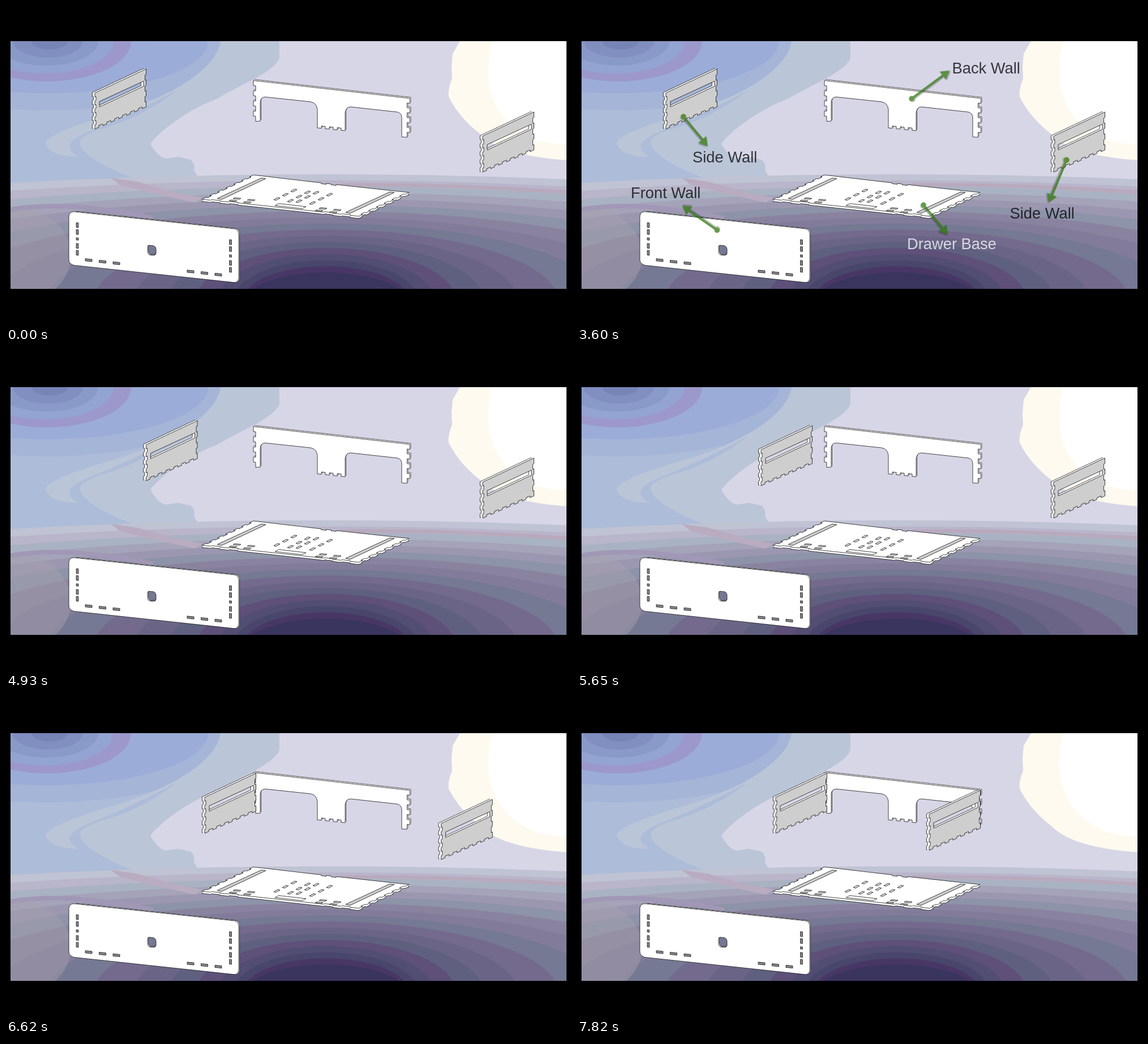
Animation of 998 by 561 pixels, one loop 8 s. Source, as an HTML page:

```html
<!DOCTYPE html>
<html lang="en">
<head>
<meta charset="utf-8">
<title>Drawer assembly</title>
<style>
  html, body { margin: 0; width: 100%; height: 100%; overflow: hidden; background: #000; }
  svg { display: block; width: 100vw; height: 100vh; }
  text { font: 27.3px "Liberation Sans", Arial, sans-serif; }
  .part { stroke: #151515; stroke-width: .8; stroke-linejoin: round; }
  path { fill-rule: evenodd; }
</style>
</head>
<body>
<svg id="stage" viewBox="0 0 998 561">
  <defs>
    <clipPath id="view"><rect x="8" y="62" width="982" height="437"/></clipPath>
    <filter id="shadow" x="-30%" y="-30%" width="160%" height="160%">
      <feDropShadow dx="1" dy="1.5" stdDeviation="1.2" flood-opacity=".55"/>
    </filter>
  </defs>
  <g id="backdrop" clip-path="url(#view)"></g>
  <g id="parts"></g>
  <g id="labels"></g>
</svg>
<script>
const LOOP = 8000, STEP = 120;
const byId = id => document.getElementById(id);
const repeat = (n, make) => Array.from({ length: n }, (_, i) => make(i)).join('');
const poly = points => 'M' + points.map(p => p.join(' ')).join('L') + 'Z';
const fill = (d, color, extra = '') => `<path d="${d}" fill="${color}" ${extra}/>`;
const line = (d, color, width) => `<path d="${d}" fill="none" stroke="${color}" stroke-width="${width}"/>`;
const ellipse = (cx, cy, rx, ry, color) =>
  `<ellipse cx="${cx}" cy="${cy}" rx="${rx}" ry="${ry}" fill="${color}"/>`;
const mix = (a, b, k) => a.map((v, i) => v + (b[i] - v) * k);
const rgb = c => `rgb(${c.map(Math.round)})`;

// Edge from a to b in equal segments, every second one displaced by (dx, dy)
function notched([ax, ay], [bx, by], segments, dx, dy) {
  const points = [];
  for (let i = 0; i < segments; i++)
    for (const k of [i / segments, (i + 1) / segments])
      points.push([ax + (bx - ax) * k + (i % 2) * dx, ay + (by - ay) * k + (i % 2) * dy]);
  return points;
}

// Plate swept by (dx, dy): outlined back, plain filling, front face
function plate(d, dx, dy, face = '#fff') {
  const copy = (k, extra) => fill(d, '#fff', `${extra} transform="translate(${dx * k} ${dy * k})"`);
  return copy(1, 'class="part"') + copy(.7, '') + copy(.35, '') + fill(d, face, 'class="part"');
}

function hazeBand(i, count) {
  const u = i / (count - 1);
  const pale = [191, 195, 211], middle = [139, 137, 163], dark = [60, 51, 95];
  const base = u < .35 ? mix(pale, middle, u / .35) : mix(middle, dark, (u - .35) / .65);
  const tint = 4 * Math.sin(i * 2.2);
  const color = rgb([base[0] + tint, base[1] - tint, base[2]]);
  return ellipse(565, 520, 142 + 1400 * (1 - u) ** 2, 223 - 173 * u, color);
}

function backdrop() {
  const ringOuter = [147, 163, 210], ringCore = [118, 133, 181];
  return '<rect x="8" y="62" width="982" height="437" fill="#adbcd8"/>' +
    ellipse(72, 62, 345, 122, '#a5b5d7') + ellipse(72, 62, 285, 92, '#9bacd8') +
    ellipse(72, 62, 149, 71, '#9c98cb') +
    repeat(4, i => ellipse(68 + 3 * i, 62, 122 - 30 * i, 57 - 14 * i, rgb(mix(ringOuter, ringCore, i / 3)))) +
    // pale sweep with two tongues
    fill('M379 62Q374 96 325 130T190 190Q70 225 70 243Q78 266 128 266Q88 244 150 220T300 150' +
      'Q240 196 180 213T132 247Q142 272 230 306L400 330L520 300V62Z', '#bbc5d8') +
    fill('M483 62V92C474 116 420 136 372 164C318 184 268 224 255 243C262 256 274 270 284 269' +
      'L304 266L326 271Q335 279 332 290L350 320H990V62Z', '#d7d6e7') +
    fill('M802 62L789 84L787 108L788 128Q780 148 782 160Q800 197 838 226Q875 264 990 272V62Z', '#fffaef') +
    fill('M858 62Q850 95 852 130C858 180 885 214 930 234Q958 244 990 244V62Z', '#fff') +
    repeat(17, i => hazeBand(i, 17)) +
    '<g opacity=".45">' + ellipse(15, 440, 100, 85, '#a4a0ac') + '</g>' +
    fill('M185 303L232 310L300 329L347 338L334 347L262 331L200 315Z', '#b9acc0') +
    fill('M590 313Q760 310 990 325V332Q780 317 590 319Z', '#b8a9bd') +
    line('M8 359Q110 342 260 374', '#a197b6', 8);
}

function sideWall() {
  const outline = [
    [157, 153.5],
    ...notched([247.5, 111], [247.5, 178], 7, -2, 1),
    ...notched([247.5, 178], [157, 217], 13, 0, -3),
    ...notched([157, 217], [157, 153.5], 9, 2, -1)
  ];
  const slot = [[165, 168.5], [243, 132.5], [243, 141.5], [165, 178]];
  return plate(poly(outline) + poly(slot), -4.6, -.8, '#cecece');
}

function backWall() {
  const left = notched([437, 131.5], [437, 203], 8, 4, .5).reverse();
  const right = notched([713.5, 163], [713.5, 232], 8, -5, -.5);
  const tab = notched([599, 220], [550, 215], 7, 0, -4);
  return plate('M' + left.join('L') + 'L' + right.join('L') +
    'L699 231V197Q699 189 691 187L609 178Q600 178 599 188L' + tab.join('L') +
    'V183Q549 171 538 169L458 160.5Q449 161 449 170V203Z', 1.5, -1.8);
}

function drawerBase() {
  const top = [
    ...notched([346, 341], [437, 298], 13, 3, .5),
    ...notched([548, 311], [592, 316], 5, 0, 1.5),
    ...notched([712, 329], [623, 371], 13, -3, -.5),
    ...notched([623, 371], [546, 362], 5, 1, -1),
    ...notched([425, 349], [346, 341], 5, 1, -1)
  ];
  const slit = (x, y) => poly([[x - 5, y + 2], [x + 2, y - 2], [x + 6, y - 1], [x - 1, y + 3]]);
  const flat = (x, y) => poly([[x - 7, y + .3], [x - 4, y - 1.4], [x + 7, y - .2], [x + 4, y + 1.5]]);
  const channel = (x, y) => poly([[x, y], [x + 78, y - 36], [x + 86, y - 35], [x + 8, y + 1.7]]);
  const slits = repeat(12, i => {
    const odd = i % 2, pair = (i >> 1) % 2, row = i >> 2;
    return slit(508 + 24 * odd + 39 * pair - 15 * row, 325 + 3.3 * odd + 4 * pair + 7.4 * row);
  });
  const flats = repeat(8, i => {
    const odd = i % 2, row = (i >> 1) % 2, side = i >> 2;
    return flat(408 + 25 * odd - 7 * row + 152 * side, 339.5 + 2.8 * odd + 4 * row + 17.5 * side);
  });
  return plate(poly(top), 0, 3.8) +
    fill(channel(373, 339.5) + channel(600, 364), '#cecece', 'class="part"') +
    fill(slits + flats, '#e3e3e3', 'class="part"') +
    fill('M475 352L482 348.5L530 354L523 357.5Z', '#fff', 'class="part"');
}

function frontWall() {
  const body = 'M121 363L403 393Q411 394 411 403V479Q411 488.5 402 487.6L120 457.4Q111 455 111 447V371Q112 362 121 363Z';
  const hole = 'M253 422L261 423Q265 425 265 429V437Q264 440 260 440L253 439Q250 437 250 433V425Q250 422 253 422Z';
  // Parallelogram following the slope of the panel
  const slot = (x, y, w, h) => poly([[x - w, y - h - w * .1], [x + w, y - h + w * .1],
    [x + w, y + h + w * .1], [x - w, y + h - w * .1]]);
  const upright = repeat(5, i => {
    const h = i === 2 ? 2 : 4.2, dy = (i - 2) * 12.2;
    return slot(126, 411 + dy, 1.9, h) + slot(396.5, 441 + dy, 1.9, h);
  });
  const level = repeat(6, i => {
    const dx = 24.5 * i + (i > 2 ? 106.5 : 0);
    return slot(146, 448.3, 6, 2).replace('M', 'M') && slot(146 + dx, 448.3 + dx * .112, 6, 2);
  });
  return plate(body + hole, 1.5, -.8) + fill(upright + level, '#85858c', 'class="part"');
}

function arrow(x1, y1, x2, y2) {
  const length = Math.hypot(x2 - x1, y2 - y1);
  const angle = Math.atan2(y2 - y1, x2 - x1) * 180 / Math.PI;
  return `<g transform="translate(${x1} ${y1}) rotate(${angle})" fill="#317707" filter="url(#shadow)">
    <circle r="4.7"/><path d="M0-2H${length - 15}V-9L${length} 0L${length - 15} 9V2H0Z"/></g>`;
}

const label = (text, x, y, pointer, color = '#000') =>
  arrow(...pointer) + `<text x="${x}" y="${y}" fill="${color}">${text}</text>`;

byId('backdrop').innerHTML = backdrop();
byId('parts').innerHTML = backWall() + `<g id="left">${sideWall()}</g><g id="right">${sideWall()}</g>` +
  drawerBase() + frontWall();
byId('labels').innerHTML =
  label('Side Wall', 204, 276, [188, 195, 231, 247]) +
  label('Back Wall', 662.5, 119, [591, 163.5, 658, 114]) +
  label('Side Wall', 764.5, 375, [865, 271.5, 833.5, 347]) +
  label('Front Wall', 95, 339, [247.5, 395.5, 186, 353]) +
  label('Drawer Base', 583, 429, [612, 351, 655, 403], '#fff');

const stepsSince = (t, start, max) =>
  Math.max(0, Math.min(max, Math.floor((t - start) / STEP) + 1));

function draw() {
  const t = performance.now() % LOOP;
  const left = stepsSince(t, 4210, 15) / 15;
  const right = stepsSince(t, 6140, 15) / 15;
  byId('labels').setAttribute('opacity', (stepsSince(t, 120, 4) - stepsSince(t, 3600, 4)) / 4);
  byId('left').setAttribute('transform', `translate(${194 * left} ${21.7 * left})`);
  byId('right').setAttribute('transform', `translate(${685 - 220 * right} ${76 - 24.3 * right})`);
  requestAnimationFrame(draw);
}
draw();
</script>
</body>
</html>
```
